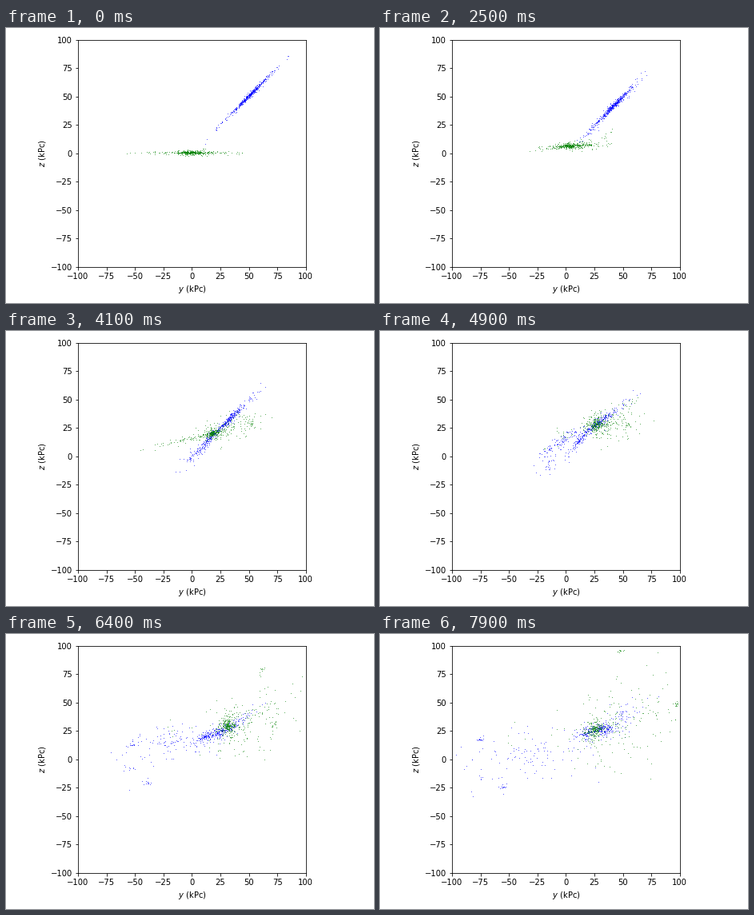
Recreate the animation shown at these times as a matplotlib script. Size 460x344 px, loop 8000 ms.

```python
import numpy as np
import matplotlib.pyplot as plt
from matplotlib.animation import FuncAnimation

W, H, DPI = 460, 344, 72
FRAMES, STEP = 80, 100
LIM = 100
rng = np.random.default_rng(7)

# Times (s) at which the shape of every star group is described.
TIMES = np.array([0, 1.4, 2.5, 4.1, 5.7, 7.1, 7.9])


def disc(y, z, tilt):
    """Opening rows for a flat disc: centre y, z, spread, slope, thickness."""
    dy, dz, dk = (2, 1.3, .045) if tilt == 0 else (-2.5, -3, 0)
    return lambda w: [(y, z, w, tilt, 1.0 + .3 * tilt),
                      (y + dy, z + dz, .84 * w, tilt + dk, 1.0 + .2 * tilt)]


class Group:
    """Stars sharing one drifting, shearing cloud, each on its own orbit."""

    def __init__(self, start, n, width, spin, rows):
        self.keys = np.array(start(width) + rows, float)
        self.slopes = np.gradient(self.keys, TIMES, axis=0)
        self.r = np.clip(rng.gamma(2, .58, n), 0, 3.3)
        self.phase = rng.uniform(0, 2 * np.pi, n)
        self.omega = spin / (.4 + self.r)
        self.lift = rng.normal(0, 1.2, n)
        self.lift_phase = rng.uniform(0, 2 * np.pi, n)

    def shape(self, t):
        i = min(np.searchsorted(TIMES, t, "right") - 1, len(TIMES) - 2)
        h = TIMES[i + 1] - TIMES[i]
        s = (t - TIMES[i]) / h
        a, b = self.keys[i], self.keys[i + 1]
        da, db = self.slopes[i] * h, self.slopes[i + 1] * h
        return ((2 * s**3 - 3 * s**2 + 1) * a + (s**3 - 2 * s**2 + s) * da
                + (3 * s**2 - 2 * s**3) * b + (s**3 - s**2) * db)

    def at(self, t):
        y, z, spread, slope, thick = self.shape(t)
        u = max(spread, .6) * self.r * np.cos(self.phase + self.omega * t)
        v = max(thick, .6) * self.lift * np.cos(
            self.lift_phase + .7 * self.omega * t)
        return np.array([y + u, z + slope * u + v])


flat = disc(0, 0, 0)
steep = disc(51, 51, 1)

green = [
    # core
    Group(flat, 210, 9, 1.2, [
        (2, 6, 5, .02, 1.3), (18, 20, 5, .2, 2.5), (33, 32, 4, 0, 6),
        (28, 25, 4.5, .2, 5), (25, 25, 5.5, .2, 5)]),
    # disc that puffs up into a halo
    Group(flat, 130, 17, .4, [
        (12, 6.5, 11, .04, 1.8), (30, 24, 15, .25, 6), (43, 28, 14, 0, 11),
        (37, 27, 24, .05, 18), (40, 28, 28, .1, 22)]),
    # trailing arm
    Group(flat, 50, 20, .25, [
        (-8, 5, 9, .12, 1.2), (-8, 14, 15, .2, 2.5), (50, 42, 17, .7, 8),
        (62, 40, 22, .3, 14), (70, 45, 25, 0, 18)]),
    # ejected clumps
    Group(flat, 10, 20, .2, [
        (35, 15, 5, .8, 3), (50, 32, 4, .5, 4), (62, 64, 3, .2, 4),
        (56, 90, 1, 0, 1.5), (47, 95, 2, 0, .8)]),
    Group(flat, 14, 19, .2, [
        (22, 7, 2, 0, 1), (52, 29, 3, 0, 4), (56, 26, 4, 0, 3),
        (88, 38, 3, 0, 4), (97, 48, 1.5, 0, 2)]),
]

blue = [
    # core
    Group(steep, 190, 7.5, 1.2, [
        (43, 43, 4.5, 1, 1.5), (33, 32, 7, 1, 2), (24, 25, 9, .5, 2.5),
        (27, 23, 5, .3, 3), (32, 26, 6, 0, 3)]),
    # lower half
    Group(steep, 95, 10, .6, [
        (42, 42, 9, 1, 2.2), (18, 18, 5, .9, 2.5), (10, 14, 4, 1.2, 4),
        (14, 24, 5, 0, 3), (18, 22, 5, .3, 5)]),
    # upper half
    Group(steep, 60, 12, .4, [
        (53, 52, 8, 1, 2.5), (42, 41, 12, .9, 3), (38, 33, 14, .6, 4),
        (44, 35, 9, .7, 4), (48, 38, 13, .5, 8)]),
    # tidal arm
    Group(steep, 90, 12, .25, [
        (37, 36, 7, .95, 1.5), (14, 13, 7, 1.1, 3), (-14, 17, 14, .2, 5),
        (-18, 10, 21, .15, 13), (-27, 2, 25, .1, 15)]),
    # ejected clumps and strays
    Group(steep, 12, 13, .2, [
        (20, 17, 4, 1, 1.5), (-2, -3, 6, 1, 3), (-28, -17, 4, 0, 3),
        (-48, -24, 1.2, 0, 1), (-55, -25, 2, 0, 1)]),
    Group(steep, 14, 13, .2, [
        (28, 27, 3, 1, 1), (8, 6, 3, 1, 2), (-36, 11, 3, .8, 3),
        (-64, 15, 4, .3, 1.5), (-75, 17, 2, .3, 1.5)]),
    Group(steep, 14, 14, .2, [
        (25, 24, 8, 1, 2), (0, 0, 6, .8, 5), (-33, -8, 6, 0, 9),
        (-75, -10, 15, 0, 20), (-80, -15, 18, -.3, 25)]),
]

fig = plt.figure(figsize=(W / DPI, H / DPI), dpi=DPI, facecolor="white")
ax = fig.add_axes([90 / W, 45 / H, 284.7 / W, 284.4 / H])
ax.set_xlim(-LIM, LIM)
ax.set_ylim(-LIM, LIM)
ticks = np.arange(-LIM, LIM + 1, 25)
ax.set_xticks(ticks)
ax.set_yticks(ticks)
ax.set_xlabel("$y$ (kPc)")
ax.set_ylabel("$z$ (kPc)")

galaxies = [(blue, ax.plot([], [], ",", color="blue", alpha=.6)[0]),
            (green, ax.plot([], [], ",", color="green", alpha=.6)[0])]


def update(i):
    t = i * STEP / 1000
    for groups, dots in galaxies:
        dots.set_data(*np.hstack([g.at(t) for g in groups]))
    return [dots for _, dots in galaxies]


anim = FuncAnimation(fig, update, frames=FRAMES, interval=STEP,
                     repeat=True, repeat_delay=0)
plt.show()
```
